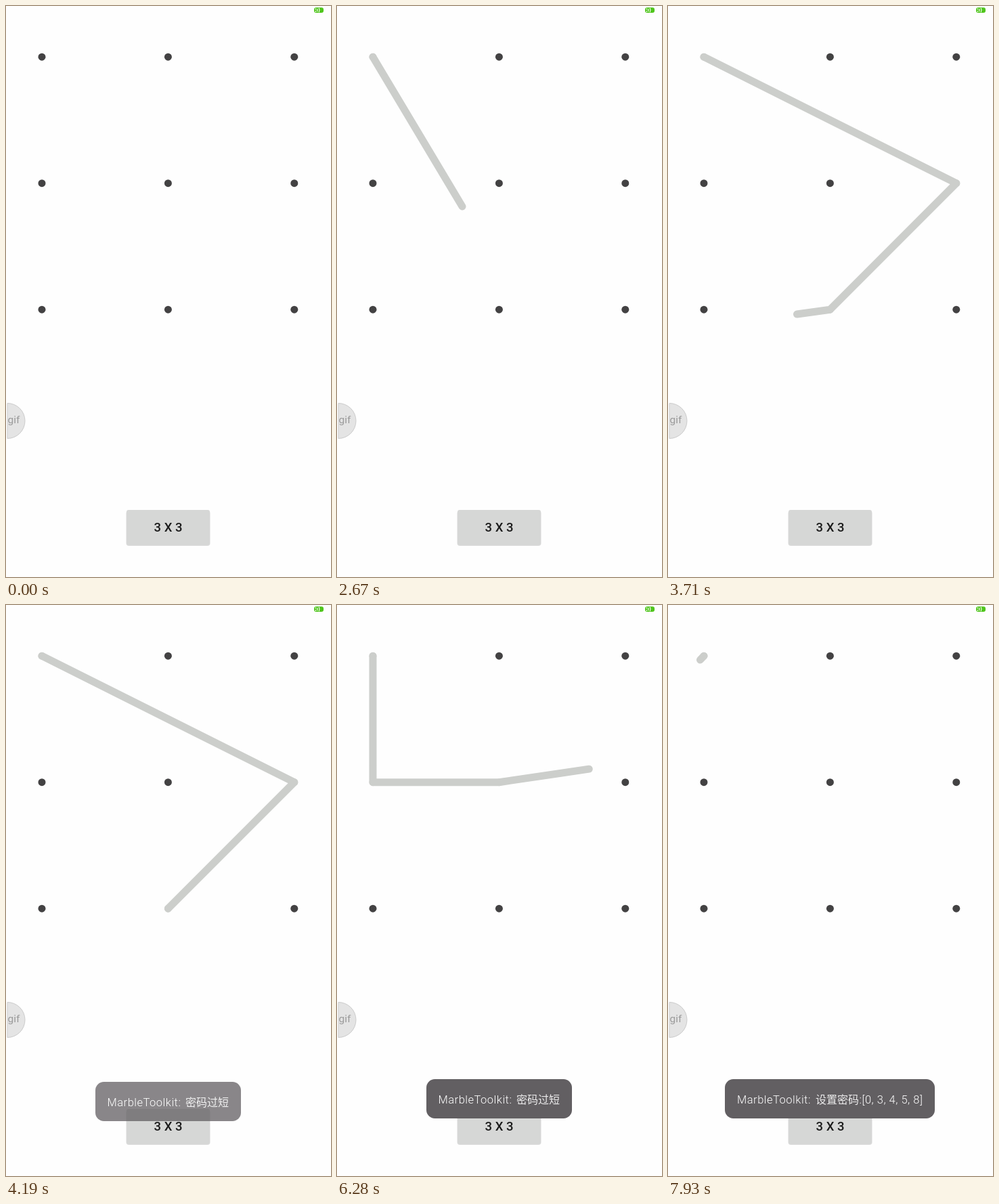
An HTML page for the animation above (7.99 s loop, 480 by 843 pixels).

```html
<!DOCTYPE html>
<html lang="zh-CN">
<head>
<meta charset="utf-8">
<title>Pattern lock</title>
<style>
  html, body { margin: 0; width: 100%; height: 100%; overflow: hidden; background: #fefefe; }
  svg { display: block; width: 480px; height: 843px; }
  text { font-family: Roboto, "Noto Sans CJK SC", "Noto Sans CJK", sans-serif; }
  .dot { fill: #434243; }
  .dot.on { fill: #cccecb; }
  #trail { fill: none; stroke: #cccecb; stroke-width: 11; stroke-linecap: round; stroke-linejoin: round; }
  .toast rect { fill: #625f62; }
  .toast text { fill: #fff; font-size: 16px; font-weight: 300; }
  .latin { font-size: 16.5px; letter-spacing: .5px; }
  .han { fill-opacity: .88; }
</style>
</head>
<body>
<svg viewBox="0 0 480 843">
  <g id="battery">
    <rect x="455" y="2.3" width="14" height="7.6" rx="3" fill="#4fc51c"/>
    <path d="M457.3 3.6v2M457.3 7v2M459.8 4v4.4M462.2 3q1.6 3 0 6.2" fill="none" stroke="#fff" stroke-width="1.1"/>
  </g>
  <g id="dots"></g>
  <polyline id="trail"/>
  <g id="bubble">
    <path d="M2 586.5a26 26 0 0 1 0 52z" fill="#e4e4e4" stroke="#cbcbcb"/>
    <text x="2.5" y="616" font-size="15.5" fill="#9a9a9a">gif</text>
  </g>
  <g id="button">
    <rect x="177.5" y="745" width="124" height="52" rx="4" fill="#000" opacity=".14"/>
    <rect x="178" y="744" width="123" height="51.5" rx="3" fill="#d6d7d6"/>
    <text x="239.5" y="776" font-size="18.5" font-weight="500" text-anchor="middle" fill="#1b1b1b">3 X 3</text>
  </g>
  <g class="toast" id="short">
    <rect x="132" y="700" width="215" height="58" rx="12.5"/>
    <text y="736"><tspan class="latin" x="149.5">MarbleToolkit:</tspan><tspan class="han" x="265">密码过短</tspan></text>
  </g>
  <g class="toast" id="saved">
    <rect x="84" y="700" width="310" height="58" rx="12.5"/>
    <text y="736"><tspan class="latin" x="102">MarbleToolkit:</tspan><tspan class="han" x="218">设置密码</tspan><tspan class="latin" x="282.5">:[0, 3, 4, 5, 8]</tspan></text>
  </g>
</svg>
<script>
const LOOP = 7990, STEP = 92.5, PHASE = 1555; // screen refresh
const REACH = 30;   // a finger this near selects a dot
const LINGER = 890; // the finished pattern stays this long
const $ = id => document.getElementById(id);
const dotAt = i => [53 + (i % 3) * 186.4, 75.2 + Math.floor(i / 3) * 186.5];

// Finger strokes as key points: [time, x, y]; the last one is the lift
const strokes = [
  [[1330, 27, 86], [1560, 27, 86], [2280, 155, 90], [2665, 185, 296], [3120, 425, 285],
   [3220, 420, 335], [3540, 250, 450], [3710, 179, 456], [3990, 451, 403], [4090, 451, 403]],
  [[5160, 30, 93], [5320, 30, 93], [5790, 58, 274], [6070, 160, 258],
   [6272, 372, 242], [6450, 445, 300], [6730, 440, 456]],
  [[7930, 47.5, 81], [LOOP, 47.5, 81]]
];

const dots = Array.from({ length: 9 }, (_, i) => {
  const c = document.createElementNS("http://www.w3.org/2000/svg", "circle");
  const [x, y] = dotAt(i);
  c.setAttribute("cx", x);
  c.setAttribute("cy", y);
  c.setAttribute("r", 5.5);
  return $("dots").appendChild(c);
});

function fingerAt(keys, t) {
  const i = keys.findIndex(k => k[0] > t);
  if (i < 1) return keys[i < 0 ? keys.length - 1 : 0].slice(1);
  const [t0, x0, y0] = keys[i - 1], [t1, x1, y1] = keys[i];
  const p = (t - t0) / (t1 - t0);
  return [x0 + (x1 - x0) * p, y0 + (y1 - y0) * p];
}

// Dots touched up to time t, in order
function touched(keys, t) {
  const hits = new Set();
  for (let s = keys[0][0]; s <= t; s += 10) {
    const [x, y] = fingerAt(keys, s);
    dots.forEach((_, i) => {
      const [dx, dy] = dotAt(i);
      if (Math.hypot(x - dx, y - dy) < REACH) hits.add(i);
    });
  }
  return [...hits];
}

function drawPattern(t) {
  const keys = strokes.find(k => t >= k[0][0] && t < k[k.length - 1][0] + LINGER);
  let hits = [], points = [];
  if (keys) {
    const lift = keys[keys.length - 1][0];
    const tick = PHASE + Math.floor((t - PHASE) / STEP) * STEP;
    const seen = Math.min(lift, Math.max(keys[0][0], tick));
    hits = touched(keys, seen);
    points = hits.map(dotAt);
    if (t < lift) points.push(fingerAt(keys, seen));
  }
  $("trail").setAttribute("points", points.map(p => p.join()).join(" "));
  dots.forEach((d, i) => d.setAttribute("class", hits.includes(i) ? "dot on" : "dot"));
}

// Rises in over two refreshes, sinks out over three
function drawToast(id, t, show, hide) {
  const part = (from, n) => Math.min(1, Math.max(0, (Math.floor((t - from) / STEP) + 1) / n));
  const away = (1 - part(show, 2)) ** 2, gone = part(hide, 3);
  $(id).setAttribute("transform", `translate(0 ${16 * away + 100 * gone * gone})`);
  $(id).setAttribute("opacity", (1 - away) * (1 - gone));
}

function draw(t) {
  drawPattern(t);
  drawToast("short", t, 4185, 6360);
  drawToast("saved", t, 6845, LOOP);
}

const start = performance.now();
function frame(now) {
  draw(Math.max(0, now - start) % LOOP);
  requestAnimationFrame(frame);
}
draw(0);
requestAnimationFrame(frame);
</script>
</body>
</html>
```
